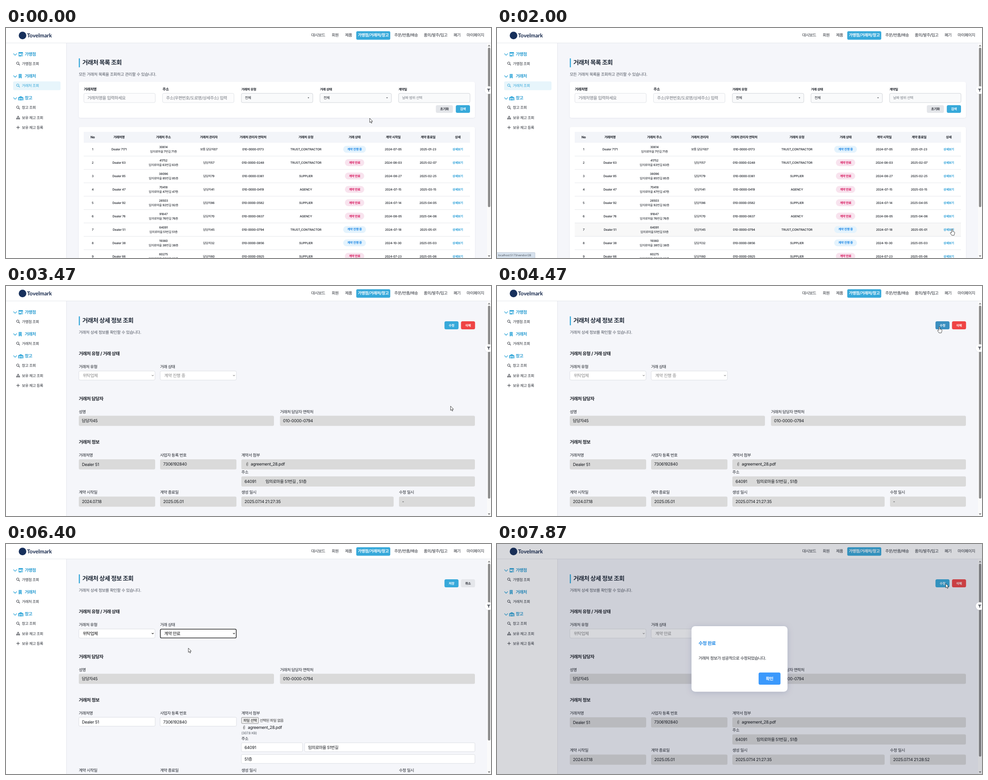
Recreate the animation shown at these times as an HTML page. Size 1086 by 515 pixels, loop 8 s.

```html
<!DOCTYPE html>
<html lang="ko">
<head>
<meta charset="utf-8">
<title>거래처 관리</title>
<style>
html, body { margin: 0; width: 100%; height: 100%; overflow: hidden; background: #f5f6fa; }
svg { display: block; width: 100%; height: 100%; }
text { font-family: Inter, "Noto Sans CJK KR", "Noto Sans CJK", sans-serif; letter-spacing: -.03em; text-rendering: geometricPrecision; white-space: pre; }
.ko { letter-spacing: -.056em; }
.logo { font-family: Lato, sans-serif; letter-spacing: 0; }
.url { font-family: "Open Sans", sans-serif; letter-spacing: 0; }
.card { filter: drop-shadow(0 1px 1.5px rgba(30, 40, 70, .07)); }
.modal { filter: drop-shadow(0 2px 7px rgba(40, 50, 120, .2)); }
</style>
</head>
<body>
<svg id="stage" viewBox="0 0 1086 515" preserveAspectRatio="none"></svg>
<script>
const BLUE = '#37a9da', DEEP = '#3b8fc0', INK = '#1c2028', SOFT = '#e4e6ea', GRAY = '#dadada';

const rect = (x, y, x2, y2, fill, r = 0, stroke = '', extra = '') =>
  `<rect x="${x}" y="${y}" width="${x2 - x}" height="${y2 - y}" rx="${r}" fill="${fill}"` +
  (stroke ? ` stroke="${stroke}" stroke-width=".8"` : '') + ` ${extra}/>`;

// y is the optical middle of the line
function text(s, x, y, size, fill = INK, weight = 400, anchor = 'start', cls = '') {
  const runs = s.replace(/[가-힣]+/g, '<tspan class="ko">$&</tspan>');
  return `<text x="${x}" y="${(y + size * .36).toFixed(2)}" font-size="${size}" font-weight="${weight}"` +
    ` text-anchor="${anchor}" class="${cls}"${fill ? ` fill="${fill}"` : ''}>${runs}</text>`;
}
const mid = (s, x, y, size, fill, weight) => text(s, x, y, size, fill, weight, 'middle');
const group = (id, ...parts) => `<g id="${id}">${parts.join('')}</g>`;
const line = (d, color, w = 1) =>
  `<path d="${d}" fill="none" stroke="${color}" stroke-width="${w}" stroke-linecap="round" stroke-linejoin="round"/>`;
const shape = (d, fill) => `<path d="${d}" fill="${fill}" fill-rule="evenodd"/>`;
const button = (x, y, x2, y2, fill, label, color, size = 7.2, id = '') =>
  rect(x, y, x2, y2, fill, 3.5, '', id && `id="${id}"`) + mid(label, (x + x2) / 2, (y + y2) / 2, size, color, 700);

function header() {
  const nav = [['대시보드', 699], ['회원', 737], ['제품', 767], ['주문/반품/배송', 896],
    ['품의/발주/입고', 962], ['폐기', 1010], ['마이페이지', 1051]];
  return rect(0, 0, 1086, 33, '#fff') + rect(0, 33, 1086, 34, '#e4e6eb') +
    '<circle cx="37" cy="16.7" r="8.5" fill="#17305c"/>' +
    text('Tovelmark', 47, 16.5, 12.2, '#14264a', 700, 'start', 'logo') +
    nav.map(([s, x]) => mid(s, x, 16.2, 9, '#2c3038', 500)).join('') +
    rect(784.3, 7.2, 860.4, 26.2, BLUE, 3) + mid('가맹점/거래처/창고', 822.4, 16.2, 9, '#fff', 700);
}

const lens = (x, y, c) => `<circle cx="${x - .7}" cy="${y - .7}" r="2.7" fill="none" stroke="${c}" stroke-width="1"/>` +
  line(`M${x + 1.4} ${y + 1.4}l2.2 2.2`, c, 1.1);

function sidebar() {
  const icons = [
    'M28.5 54h9l1 3.2h-11zM28.3 58h1.4v3h4v-3h1.3v5.5h-6.7zM36.3 58h1.3v5.5h-1.3z',
    'M28.5 103h6.5v9.5h-2.2v-2h-2v2h-2.3zM30 104.6v1.2h1.2v-1.2zM32.4 104.6v1.2h1.2v-1.2zM30 107.2v1.2h1.2v-1.2zM32.4 107.2v1.2h1.2v-1.2z',
    'M27.3 155.5l5.7-3 5.8 3v6.5h-1.8v-5h-8v5h-1.7zM29.8 158h6.5v1h-6.5zM29.8 159.8h6.5v2.2h-6.5z'
  ];
  const heads = [['가맹점', 58.5], ['거래처', 107.7], ['창고', 157]];
  const item = (s, y, c = '#2c3038') => text(s, 35.5, y, 8.4, c, 500);
  return rect(0, 34, 135, 515, '#fff') + rect(135, 34, 136, 515, '#e4e6eb') +
    rect(16, 119.5, 122, 139.3, '#e7f5fb', 3, '', 'id="active"') +
    heads.map(([s, y], i) => line(`M17 ${y - 1}l3.4 3.6 3.4-3.6`, BLUE, 1.3) +
      shape(icons[i], BLUE) + text(s, 42, y, 9.6, '#2f9fd3', 700)).join('') +
    lens(27, 79.5, '#2c3038') + item('가맹점 조회', 79.5) +
    group('pick', lens(27, 128.8, BLUE), item('거래처 조회', 129, BLUE)) +
    group('unpick', lens(27, 128.8, '#2c3038'), item('거래처 조회', 129)) +
    lens(27, 178, '#2c3038') + item('창고 조회', 178.3) +
    shape('M26 197h2.2v2H26zM24.4 199.8h2.1v1.8h-2.1zM27.7 199.8h2.1v1.8h-2.1zM23 202.3h2.2v2H23zM26 202.3h2.2v2H26zM29 202.3h2.2v2H29z', '#2c3038') +
    item('보유 재고 조회', 200.5) +
    line('M27 219.4v6.6M23.7 222.7h6.6', '#2c3038') + item('보유 재고 등록', 222.7);
}

const title = (head, sub) => rect(163, 68, 165.4, 88, BLUE) +
  text(head, 171, 77.6, 13.57, '#1f2937', 700) + text(sub, 163, 103.6, 9.1, '#4f5560');

const ROW = 29.95, TOP = 257;
function table() {
  const cols = [194, 253, 352.5, 454, 553, 671.5, 780.5, 867, 945, 1011.5];
  const names = ['No', '거래처명', '거래처 주소', '거래처 관리자', '거래처 관리자 연락처',
    '거래처 유형', '거래 상태', '계약 시작일', '계약 종료일', '상세'];
  const rows = [
    'Dealer 7171|30614|7번길 71층|보통 담당자07|0173|T|1|2024-07-05|2025-01-23',
    'Dealer 63|41752|63번길 63층|담당자57|0248|T|0|2024-08-03|2025-02-07',
    'Dealer 85|38096|85번길 85층|담당자79|0361|S|0|2024-08-27|2025-02-25',
    'Dealer 47|70418|47번길 47층|담당자41|0419|A|0|2024-07-15|2025-03-15',
    'Dealer 92|26503|92번길 92층|담당자86|0582|S|0|2024-07-14|2025-04-05',
    'Dealer 76|91847|76번길 76층|담당자70|0637|A|0|2024-08-05|2025-04-06',
    'Dealer 51|64091|51번길 51층|담당자45|0794|T|1|2024-07-18|2025-05-01',
    'Dealer 38|19360|38번길 38층|담당자32|0856|S|1|2024-10-30|2025-05-03',
    'Dealer 66|60275|66번길 66층|담당자60|0925|S|0|2024-07-23|2025-05-06'
  ];
  const kinds = { T: 'TRUST_CONTRACTOR', S: 'SUPPLIER', A: 'AGENCY' };
  let out = rect(163, 221.5, 1050, 530, '#fff', 4, '', 'class="card"') +
    rect(174, 232.5, 1039, TOP, '#f3f5f9') +
    rect(174, 0, 1039, ROW, '#f8f8f8', 0, '', 'id="hover"') +
    names.map((s, i) => mid(s, cols[i], 244.6, 7.3, INK, 700)).join('');
  rows.forEach((row, i) => {
    const [name, zip, road, boss, tel, kind, on, from, to] = row.split('|');
    const y = 271.6 + ROW * i, open = on === '1', half = open ? 25.5 : 21.7;
    const cell = (s, c, dy = 0) => mid(s, cols[c], y + dy, 6.79, INK, 500);
    out += rect(174, TOP + ROW * (i + 1) - .5, 1039, TOP + ROW * (i + 1) + .3, '#dfe2e6') +
      cell(String(i + 1), 0) + cell(name, 1) + cell(zip, 2, -4.7) + cell('임의로마을 ' + road, 2, 5.2) +
      cell(boss, 3) + cell('010-0000-' + tel, 4) + cell(kinds[kind], 5) +
      rect(780.5 - half, y - 7.8, 780.5 + half, y + 7.6, open ? '#e4f3fd' : '#f8e3ee', 7.7) +
      mid(open ? '계약 진행 중' : '계약 만료', 780.5, y - .3, 6.9, open ? '#1e88e5' : '#d81b60', 700) +
      cell(from, 7) + cell(to, 8) + mid('상세보기', cols[9], y, 6.79, '#2b9fd8', 700);
  });
  return out;
}

function filters() {
  const box = (x, fill, edge) => rect(x, 146.3, x + 160, 167, fill, 3, edge);
  const drop = x => box(x, '#f9fafb', '#c6cad0') + text('전체', x + 8, 156.5, 7.9, INK, 500) +
    shape(`M${x + 148.6} 155.6h3.2l-1.6 1.9z`, INK);
  return rect(163, 120.5, 1050, 201, '#fff', 4, '', 'class="card"') +
    text('거래처명', 174.3, 137.3, 8.2, INK, 700) + text('주소', 350.5, 137.3, 8.2, INK, 700) +
    text('거래처 유형', 527, 137, 7.3, INK, 700) + text('거래 상태', 703, 137, 7.3, INK, 700) +
    text('계약일', 879, 137, 7.3, INK, 700) +
    box(174.3, '#fcfcfd', '#d9dce1') + text('거래처명을 입력하세요', 182.3, 156.7, 9.6, '#70757d') +
    box(350.5, '#fcfcfd', '#d9dce1') + text('주소(우편번호/도로명/상세주소) 입력', 358.5, 156.7, 9.4, '#70757d') +
    drop(527) + drop(703) + box(879, '#f9fafb', '#c6cad0') + text('날짜 범위 선택', 887, 156.5, 7.9, '#777c84') +
    button(962.5, 172.7, 1000.7, 190, SOFT, '초기화', '#2c3038', 7.4) +
    button(1007.2, 172.7, 1039, 190, BLUE, '검색', '#fff', 7.4);
}

const label = (s, x, y) => text(s, x, y, 9.05, INK, 500);
const value = (s, x, y, c = '#15181d') => text(s, x, y, 9.4, c);
const field = (x, y, x2, s = '', h = 22.7) => rect(x, y, x2, y + h, GRAY, 3) + (s && value(s, x + 7, y + 11.2));
const input = (x, y, x2, s, dx = 7) => rect(x, y, x2, y + 20, '#fff', 2.5, '#d3d6dc') + value(s, x + dx, y + 10.2);
const clip = (x, y) => line(`M${x - 1.4} ${y - 1.5}v4a1.5 1.5 0 0 0 3 0v-5.5a1 1 0 0 0-2 0v5`, '#6b6b6b', .8);
const dates = y => label('계약 시작일', 163, y) + label('계약 종료일', 345, y) +
  label('생성 일시', 527, y) + label('수정 일시', 880, y);

function detail() {
  const head = (s, y) => text(s, 163, y, 10.18, INK, 700);
  const select = x => rect(x, 190.3, x + 170.7, 210.7, '#fff', 3, '#d5d8de');
  const arrow = x => `<path d="M${x - 2} 199.3l2 2 2-2" fill="none" stroke-width="1.1"/>`;
  return title('거래처 상세 정보 조회', '거래처 상세 정보를 확인할 수 있습니다.') +
    head('거래처 유형 / 거래 상태', 151.5) + label('거래처 유형', 163, 180.7) + label('거래 상태', 345, 180.7) +
    select(163) + select(345.2) + group('arrows', arrow(328.5), arrow(510.5)) +
    group('values', text('위탁업체', 172, 200.5, 9.7, ''),
      group('running', text('계약 진행 중', 354.3, 200.5, 9.7, '')),
      group('ended', text('계약 만료', 354.3, 200.5, 9.7, ''))) +
    '<rect id="ring" x="345.6" y="190.6" width="169.9" height="19.8" rx="2.5" fill="none" stroke="#111" stroke-width="1.3"/>' +
    head('거래처 담당자', 252.5) + label('성명', 163, 281.5) + label('거래처 담당자 연락처', 613.5, 281.5) +
    field(163, 290.6, 600) + field(613.5, 290.6, 1050) +
    head('거래처 정보', 349.3) + label('거래처명', 163, 378.6) + label('사업자 등록 번호', 345, 378.6) +
    label('계약서 첨부', 527, 378.6) +
    group('person', value('담당자45', 169.8, 301.8), value('010-0000-0794', 620.3, 301.8)) +
    group('view',
      button(981.8, 79, 1013.3, 97, BLUE, '수정', '#fff', 7.2, 'editBtn'),
      button(1018.8, 79, 1050.3, 97, '#ef4444', '삭제', '#fff'),
      field(345, 388, 516), field(527, 388, 1050),
      label('주소', 527, 417), field(527, 426.3, 1050), dates(462.2),
      field(163, 471.5, 334), field(345, 471.5, 516), field(527, 471.5, 868), field(880, 471.5, 1050)) +
    group('empty', field(163, 388, 334, '', 9), value('XXXXXXXXX', 352, 399),
      value('첨부된 파일이 없습니다.', 534, 399, '#858585'),
      [[170, 301.8], [620.5, 301.8], [170, 482.7], [352, 482.7], [534, 482.7]].map(p => value('-', ...p)).join('')) +
    group('full', field(163, 388, 334, 'Dealer 51'), value('7306192840', 352, 399),
      clip(540, 398.7), value('agreement_28.pdf', 548, 399),
      value('64091', 534, 437.5), value('임의로마을 51번길 , 51층', 581, 437.5),
      value('2024.07.18', 170, 482.7), value('2025.05.01', 352, 482.7), value('2025.07.14 21:27:35', 534, 482.7)) +
    group('unsaved', value('-', 887, 482.7)) + group('saved', value('2025.07.14 21:28:52', 887, 482.7)) +
    group('edit',
      button(981.8, 79, 1013.3, 97, BLUE, '저장', '#fff', 7.2, 'saveBtn'),
      button(1018.8, 79, 1050.3, 97, SOFT, '취소', '#2c3038', 7.2, 'cancelBtn'),
      input(163, 388, 334, 'Dealer 51'), input(345, 388, 516, '7306192840'),
      rect(527.4, 388.3, 565.3, 401.8, '#efefef', 1.5, '#767676'), mid('파일 선택', 546.4, 395, 8.1, '#111'),
      text('선택된 파일 없음', 568.3, 395, 8.1, '#333'),
      clip(533, 410.7), value('agreement_28.pdf', 541.5, 411), text('(307.8 KB)', 527, 423.6, 7.6, '#555b65'),
      label('주소', 527, 435.7), input(527, 445, 664, '64091'), input(668.7, 445, 1050, '임의로마을 51번길', 7.5),
      input(527, 471.3, 1050, '51층'), dates(506.8)) +
    group('popup', rect(345.4, 211, 515.8, 247.8, '#fff', 0, '#8a8a8a'),
      rect(346, 211.5, 515.3, 229.5, '#1967d2', 0, '', 'id="option"'),
      text('계약 진행 중', 354.3, 220.5, 9.7, '', 400, 'start', 'opt'),
      text('계약 만료', 354.3, 238.5, 9.7, '', 400, 'start', 'opt'));
}

const HAND = 'M-1.1 8V1a1.1 1.1 0 0 1 2.2 0v4l3.6.9q1.3.4 1.2 2l-.6 3.2-.9 2.6h-5l-3.3-4.6q-.6-1.3.6-1.5z';
const ARROW = 'M.3 0v9.6l2.1-1.9 1.5 3.4 1.6-.7-1.5-3.3h3z';

stage.innerHTML = rect(0, 0, 1086, 515, '#f5f6fa') + header() + sidebar() +
  group('list', title('거래처 목록 조회', '모든 거래처 목록을 조회하고 관리할 수 있습니다.'), filters(), table()) +
  group('detail', detail()) +
  rect(1077, 34, 1086, 515, '#fafafa') + shape('M1079 41.3h5.4l-2.7-4zM1079 509h5.4l-2.7 4z', '#858585') +
  rect(1079.2, 44, 1084.3, 401, '#8b8b8b', 2.5, '', 'id="thumb"') +
  group('status', rect(-1, 502.7, 85, 516, '#d7e2ee', 1, '#b5c1ce'),
    text('localhost:5173/vendor/28', 2.5, 509.2, 6.2, '#39414b', 400, 'start', 'url')) +
  group('dialog', rect(0, 0, 1086, 515, 'rgba(34,40,60,.18)'),
    rect(435.5, 184, 650.5, 330.7, '#fff', 8, '', 'class="modal"'),
    text('수정 완료', 451.3, 222.5, 10.4, '#1e88e5', 700),
    text('거래처 정보가 성공적으로 수정되었습니다.', 451.3, 256, 9.15, INK),
    button(585.8, 287.8, 634.8, 315, '#3b99fc', '확인', '#fff', 9.6)) +
  '<circle cx="1081" cy="139" r="8.8" fill="#fff" class="card"/>' +
  shape('M1077 135.8h7.6l-2.8 3.8v3.4l-2-1v-2.4z', '#62666d') +
  '<path id="cursor" fill="#fff" stroke="#111" stroke-width=".75" stroke-linejoin="round"/>';

const $ = id => document.getElementById(id);
const set = (id, name, v) => $(id).setAttribute(name, v);
const show = (id, on) => set(id, 'opacity', Number(on));
const clamp = v => Math.max(0, Math.min(1, v));

const PATH = [[200, 814, 202], [1067, 1011, 447], [1400, 1027, 455], [1930, 1019, 450.5], [3000, 1019, 450.5],
  [3870, 976, 123], [3940, 976, 123], [4130, 968.5, 96], [4200, 968.5, 96], [4400, 990.5, 91.3], [4530, 990.5, 91.3],
  [5130, 390, 199], [5330, 390, 199], [5660, 388, 231], [5860, 387, 232], [6333, 387, 232], [6400, 408, 233],
  [6900, 1041, 111], [7200, 1007, 91], [7330, 1004.5, 88.5]];

function pointer(t) {
  const i = PATH.findIndex(p => p[0] > t);
  if (i === 0) return PATH[0].slice(1);
  if (i < 0) return PATH[PATH.length - 1].slice(1);
  const [t0, x0, y0] = PATH[i - 1], [t1, x1, y1] = PATH[i];
  const u = (t - t0) / (t1 - t0), k = u * u * (3 - 2 * u);
  return [x0 + (x1 - x0) * k, y0 + (y1 - y0) * k];
}

function draw(t) {
  const [x, y] = pointer(t);
  const inside = (a, b, c, d) => x >= a && x <= c && y >= b && y <= d;
  const list = t < 2660, loaded = t >= 2795, edit = t >= 4530 && t < 7795, saved = t >= 7795;
  const view = !list && !edit, chosen = t >= 6060, open = t >= 5260 && !chosen;

  show('list', list); show('detail', !list);
  show('pick', list); show('unpick', !list);
  show('active', list ? 1 : clamp((2900 - t) / 240));
  show('view', view); show('edit', edit);
  show('empty', view && !loaded); show('full', view && loaded);
  show('person', loaded); show('values', loaded);
  show('unsaved', view && !saved); show('saved', saved);
  show('running', !chosen); show('ended', chosen);
  show('ring', chosen && t < 7590);
  show('popup', open);
  set('values', 'fill', edit ? '#111' : '#8a8a8a');
  set('arrows', 'stroke', edit ? '#111' : '#8a8a8a');
  set('thumb', 'height', list ? 357 : edit ? 396 : 432);

  const second = y > 229.5;
  set('option', 'y', second ? 229.5 : 211.5);
  document.querySelectorAll('.opt').forEach((o, i) => o.setAttribute('fill', (i === 1) === second ? '#fff' : '#111'));

  const row = Math.floor((y - TOP) / ROW);
  show('hover', list && row >= 0 && x > 174 && x < 1039);
  set('hover', 'y', TOP + ROW * row);
  const onMain = inside(981.8, 79, 1013.3, 97), onSide = inside(1018.8, 79, 1050.3, 97);
  set('editBtn', 'fill', onMain && !saved ? DEEP : BLUE);
  set('saveBtn', 'fill', onMain ? DEEP : BLUE);
  set('cancelBtn', 'fill', onSide ? '#d3d6db' : SOFT);

  show('status', clamp((t - 1800) / 200) * clamp((3330 - t) / 200));
  show('dialog', clamp((t - 7730) / 130));

  const link = list && row >= 0 && x > 1000 && x < 1024 && Math.abs(y - 271.6 - ROW * row) < 5;
  const hand = !saved && (link || (!list && (onMain || onSide)));
  set('cursor', 'd', hand ? HAND : ARROW);
  set('cursor', 'transform', `translate(${x} ${y})`);
}

// the screen refreshes 15 times a second
const STEP = 1000 / 15, begin = performance.now();
function tick() {
  const t = (performance.now() - begin) % 8000;
  draw(Math.floor(t / STEP + .01) * STEP);
  requestAnimationFrame(tick);
}
tick();
</script>
</body>
</html>
```
